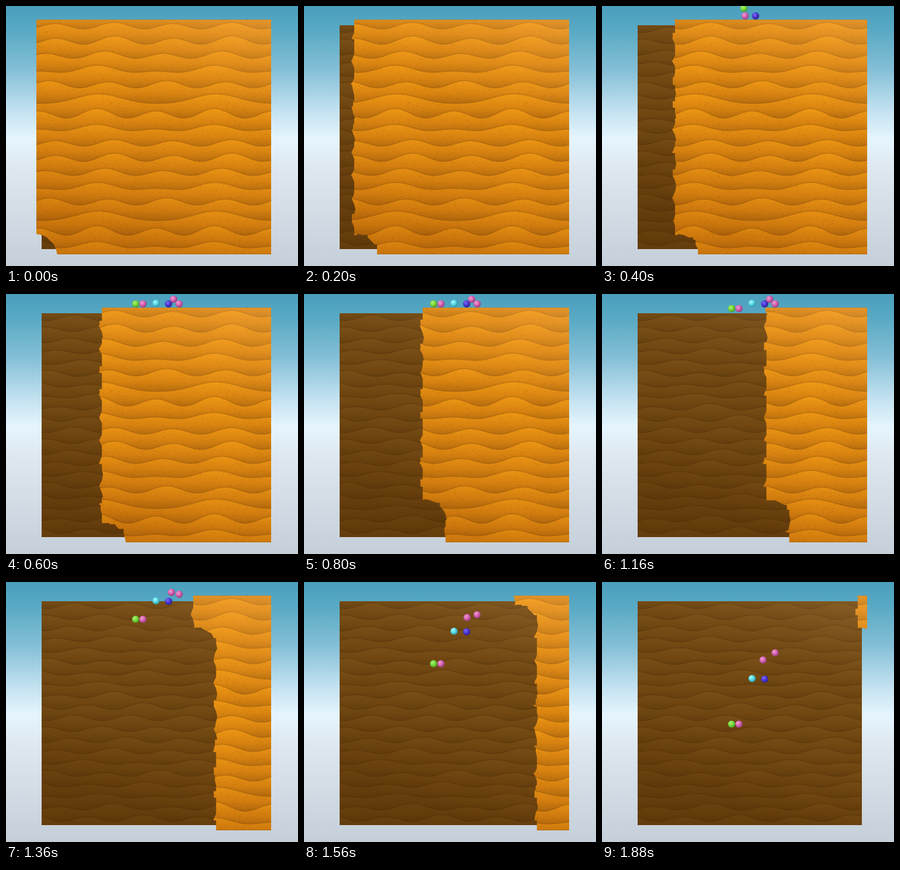
An HTML page with a canvas for the animation above (1.92 s loop, 500 px wide and 446 px high).

```html
<!DOCTYPE html>
<html>
<head>
<meta charset="utf-8">
<style>
html, body { margin: 0; width: 100%; height: 100%; overflow: hidden; }
canvas { display: block; }
</style>
</head>
<body>
<canvas id="stage" width="500" height="446"></canvas>
<script>
const W = 500, H = 446, LOOP = 1920, STEP = 40;
const ctx = document.getElementById('stage').getContext('2d');

let seed = 7;
const rand = () => (seed = (seed * 16807) % 2147483647) / 2147483647;
const clamp = v => Math.min(1, Math.max(0, v));
const mix = (a, b, f) => a + (b - a) * f;

function layer() {
  const c = document.createElement('canvas');
  c.width = W;
  c.height = H;
  return c.getContext('2d');
}

function gradient(g, x0, y0, x1, y1, stops) {
  const fill = g.createLinearGradient(x0, y0, x1, y1);
  stops.forEach(([at, color]) => fill.addColorStop(at, color));
  return fill;
}

// Piecewise linear value at time t; keys are [time, value].
function track(keys, t) {
  let value = keys[0][1];
  for (let i = 1; i < keys.length; i++) {
    const [t0, a] = keys[i - 1], [t1, b] = keys[i];
    if (t >= t0) value = mix(a, b, clamp((t - t0) / (t1 - t0)));
  }
  return value;
}

// A square of dunes, tiled twice each way. Each row is [long wave, short wave, crest].
function sand(x, y, size, rows, look) {
  const g = layer(), tile = size / 2, gap = tile / rows.length, k = 2 * Math.PI / tile;
  g.beginPath();
  g.rect(x, y, size, size);
  g.clip();
  for (let n = -1; n < rows.length * 2; n++) {
    const [long, short, crest] = rows[(n + rows.length) % rows.length];
    const base = y + gap * (n + 0.46);
    g.beginPath();
    g.moveTo(x - 20, H + 20);
    for (let u = -20; u <= size + 20; u += 2) {
      const a = k * (u - crest);
      g.lineTo(x + u, base - long * Math.cos(a) - short * Math.cos(2 * a));
    }
    g.lineTo(x + size + 20, H + 20);
    g.shadowColor = look.shadow;
    g.shadowBlur = 3;
    g.shadowOffsetY = -1;
    g.fillStyle = gradient(g, 0, base - 8, 0, base + gap + 11,
      look.band.map((color, i) => [i / 2, color]));
    g.fill();
  }
  g.shadowColor = 'transparent';
  g.fillStyle = look.dot;
  for (let i = 0; i < look.dots; i++) {
    const u = rand() * tile, v = rand() * tile;
    for (const dx of [0, tile]) for (const dy of [0, tile])
      g.fillRect(Math.round(x + u + dx), Math.round(y + v + dy), 1, 1);
  }
  g.fillStyle = gradient(g, x + size, y, x + size * 0.65, y + size, look.shade);
  g.fillRect(x, y, size, size);
  return g.canvas;
}

const frontRows = [[1, 5, 133], [2, 6, 134], [2, 5, 117], [5, 3, 105],
  [1, 5.5, 22], [8, 1, 107], [2, 7, 104], [4, 3, 103]];
const backRows = Array.from({ length: 10 }, () => [rand() * 3, 2 + rand() * 3, rand() * 192]);

const front = sand(52, 23.5, 402, frontRows, {
  band: ['#ed9612', '#d7820f', '#a9650b'], shadow: 'rgba(130,72,6,.4)',
  dot: 'rgba(146,76,4,.55)', dots: 650,
  shade: [[0, 'rgba(255,185,90,.38)'], [0.45, 'rgba(255,170,50,.04)'], [1, 'rgba(130,50,0,.18)']]
});
const back = sand(61, 33, 384, backRows, {
  band: ['#7a4f17', '#704711', '#5c390b'], shadow: 'rgba(70,40,4,.35)',
  dot: 'rgba(130,90,38,.4)', dots: 1300,
  shade: [[0, 'rgba(165,125,70,.38)'], [0.45, 'rgba(120,75,20,.05)'], [1, 'rgba(75,38,0,.35)']]
});

// Ragged round bites, taken column by column from the bottom up.
const ROWS = 11, GAP = 39.1, RADIUS = 35;
const bites = Array.from({ length: ROWS * ROWS }, (_, n) => {
  const cx = 52 + Math.floor(n / ROWS) * GAP, cy = 427 - (n % ROWS) * GAP;
  const path = new Path2D();
  let lastY = cy;
  for (let i = 0; i < 24; i++) {
    const angle = i * Math.PI / 12, r = RADIUS + rand() * 2 - 1;
    const px = cx + Math.round(r * Math.cos(angle) / 2) * 2;
    const py = cy + Math.round(r * Math.sin(angle) / 2) * 2;
    if (rand() < 0.35) path.lineTo(px, lastY);
    path.lineTo(px, py);
    lastY = py;
  }
  path.closePath();
  return path;
});
const biteCount = [[0, 1], [400, 23], [1160, 68], [1360, 86], [1560, 98], [1880, 119]];

// Balls drop in, roll apart, then sink once the sand beneath is gone.
const green = ['#a8f070', '#78d83c', '#3d8a1c'];
const pink = ['#f09ad2', '#d462b0', '#8a3470'];
const cyan = ['#a8f6fa', '#55d8e4', '#2b8794'];
const violet = ['#7c68f0', '#4a37d2', '#291c80'];
const balls = [
  { color: green, born: 317, from: 243, to: 222, rest: 17, lag: -4 },
  { color: pink, born: 200, from: 245, to: 234.5, rest: 17, lag: -4 },
  { color: cyan, born: 420, from: 256, to: 257, rest: 16, lag: 0 },
  { color: violet, born: 240, from: 263, to: 278.5, rest: 17, lag: 0 },
  { color: pink, born: 460, from: 285, to: 287, rest: 9, lag: 1.5, drift: -0.65 },
  { color: pink, born: 440, from: 290, to: 296.5, rest: 17, lag: 2.85 }
];
const sinkTime = [[1020, -4], [1360, 5.7], [1560, 11.7], [1880, 17.3], [1920, 18]];

function drawBall({ color, born, from, to, rest, lag, drift = 0 }, t) {
  if (t < born) return;
  const s = track(sinkTime, t), sink = Math.max(0, s - lag);
  const roll = clamp((t - 420) / 200);
  const x = mix(from, to, roll * (2 - roll)) + drift * Math.max(0, s);
  const y = Math.min(rest, -8 + 25 * ((t - born) / 120) ** 2) + sink * sink / 2;
  const fill = ctx.createRadialGradient(x - 2, y - 2.5, 0.5, x - 1, y - 1, 8);
  color.forEach((c, i) => fill.addColorStop(i / 2, c));
  ctx.fillStyle = fill;
  ctx.beginPath();
  ctx.arc(x, y, 6.2, 0, 2 * Math.PI);
  ctx.fill();
}

const sky = gradient(ctx, 0, 0, 0, H, [[0, '#4a9fbc'], [0.1, '#5aaac5'], [0.25, '#86c0d7'],
  [0.4, '#c2e1f0'], [0.51, '#e5f5fe'], [0.62, '#dee8f0'], [1, '#c5cfd9']]);
const cover = layer();

function draw(now) {
  const t = Math.floor((now % LOOP) / STEP) * STEP;
  ctx.fillStyle = sky;
  ctx.fillRect(0, 0, W, H);
  ctx.drawImage(back, 0, 0);

  cover.globalCompositeOperation = 'copy';
  cover.drawImage(front, 0, 0);
  cover.globalCompositeOperation = 'destination-out';
  bites.slice(0, Math.floor(track(biteCount, t))).forEach(b => cover.fill(b));
  ctx.drawImage(cover.canvas, 0, 0);

  balls.forEach(b => drawBall(b, t));
}

const start = performance.now();
function tick() {
  draw(performance.now() - start);
  requestAnimationFrame(tick);
}
tick();
</script>
</body>
</html>
```
